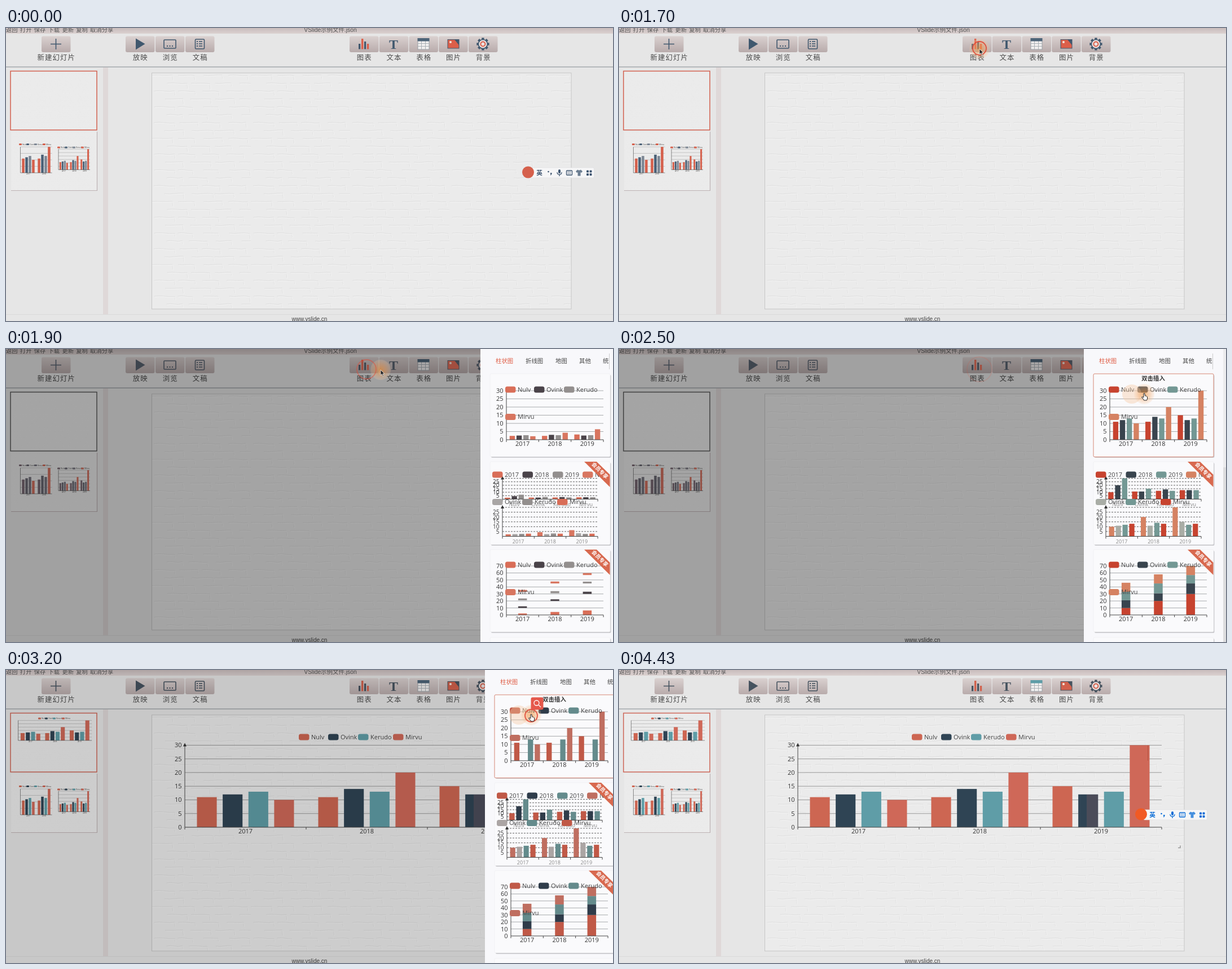
Write an HTML page that moves like this. It is 1076 px wide and 520 px high and loops after 4530 ms.

```html
<!DOCTYPE html>
<html lang="zh">
<head>
<meta charset="utf-8">
<title>Slide editor</title>
<style>
html, body { margin: 0; width: 100%; height: 100%; overflow: hidden; background: #e6e6e6; }
svg { display: block; width: 1076px; height: 520px; font-family: "Open Sans", "Noto Sans CJK SC", "Noto Sans CJK", sans-serif; }
svg {
  --ink: #40586e; --acc: #dc5f4a; --th: #4d6478; --sel: #d2604f;
  --s0: #d5604c; --s1: #4a6076; --s2: #7d8794; --s3: #d5604c;
  --p0: #d96e58; --p1: #4a4349; --p2: #938f8e; --p3: #d87660; --p4: #a9a6a5;
  --ime: #3e5570; --logo: #d5604c;
}
svg[data-look="dim"], svg[data-look="pick"] {
  --ink: #58626f; --acc: #e8705a; --sel: #5c5c5c;
  --s0: #7a6a74; --s1: #6a6872; --s2: #787680; --s3: #d2705f;
}
svg[data-look="pick"] { --p0: #c7432f; --p1: #39444e; --p2: #739894; --p3: #d58262; --p4: #a9ada6; }
svg[data-look="done"], svg[data-look="insert"] {
  --ink: #46535f; --acc: #d2614c; --th: #5f9da7; --sel: #cd6657;
  --s0: #cd6652; --s1: #2f4454; --s2: #5f9da7; --s3: #cf6858;
  --p0: #c05947; --p1: #2f3c4a; --p2: #648b8c; --p3: #bf6e60; --p4: #aba5a4;
  --ime: #0a6cd6; --logo: #f15a24;
}
svg[data-look="insert"] { --th: #4d6478; }
.ink { fill: var(--ink); } .acc { fill: var(--acc); }
.line { fill: none; stroke: var(--ink); stroke-width: 1.6; }
.cjk { font-family: "Noto Sans CJK SC", "Noto Sans CJK", sans-serif; }
.arial { font-family: "Liberation Sans", "Noto Sans CJK SC", sans-serif; }
.grow { transform-box: fill-box; transform-origin: 50% 100%; transform: scaleY(var(--k, 1)); }
.imeInk { fill: var(--ime); }
.imeLine { fill: none; stroke: var(--ime); stroke-width: 1.3; }
</style>
</head>
<body>
<svg id="stage" viewBox="0 0 1076 520" xmlns="http://www.w3.org/2000/svg"></svg>
<script>
const LOOP = 4530;
const NAMES = ['Nulv', 'Ovink', 'Kerudo', 'Mirvu'];
const YEARS = ['2017', '2018', '2019'];
const SALES = [[11, 12, 13, 10], [11, 14, 13, 20], [15, 12, 13, 30]];
const SUMS = [[10, 11, 12, 13], [20, 11, 14, 13], [30, 15, 12, 13]];
const BY_NAME = NAMES.map((_, i) => SUMS.map(row => row[i]));

const rect = (x, y, w, h, attrs = '') => `<rect x="${x}" y="${y}" width="${w}" height="${h}" ${attrs}/>`;
const path = (d, attrs = '') => `<path d="${d}" ${attrs}/>`;
const text = (x, y, size, str, attrs = '') => `<text x="${x}" y="${y}" font-size="${size}" ${attrs}>${str}</text>`;
const group = (id, body, attrs = '') => `<g id="${id}" ${attrs}>${body}</g>`;
const MID = 'text-anchor="middle"', END = 'text-anchor="end"';

// Bar chart: four fifths of each category holds bars, 30% of a bar between them.
function chart(o) {
  const { x, y, w, h, max, step, data, cats, colors, size = 11, ink = '#333', grid = '#999', lw = 1 } = o;
  const base = y + h, cat = w / data.length, n = data[0].length;
  const bw = o.stack ? cat * 0.27 : cat * 0.8 / (n + 0.3 * (n - 1));
  let out = '';
  for (let v = 0; v <= max; v += step) {
    const gy = base - v / max * h;
    if (v && !(o.dash && v === max && o.noTop))
      out += path(`M${x} ${gy}H${x + w}`, `stroke="${grid}" stroke-width="${lw}" ${o.dash ? 'stroke-dasharray="3 2"' : ''}`);
    if (!o.hush && !(o.dash && (v === 0 || v === max)))
      out += text(x - 5.5, gy + size * 0.36, size, v, `${END} fill="${ink}"`);
  }
  data.forEach((row, i) => {
    let sum = 0;
    row.forEach((v, j) => {
      const bh = v / max * h;
      const bx = x + i * cat + (o.stack ? (cat - bw) / 2 : cat * 0.1 + j * bw * 1.3);
      out += rect(bx, base - sum / max * h - bh, bw, bh,
        `style="fill:var(--${colors[j]})" class="${o.grow ? 'grow' : ''} ${o.tag && j === 1 ? o.tag : ''}"`);
      if (o.stack) sum += bh / h * max;
    });
    out += text(x + (i + 0.5) * cat, base + size * (o.drop || 1), o.catSize || size, cats[i], `${MID} fill="${o.catInk || ink}"`);
  });
  out += path(`M${x} ${y - (o.arrow ? 2 : 0)}V${base}H${x + w}`, `fill="none" stroke="#444" stroke-width="${lw}"`);
  if (!o.hush) for (let i = 0; i <= data.length; i++)
    out += path(`M${x + i * cat} ${base}v4`, 'stroke="#444"');
  if (o.arrow) out += path(`M${x - 3} ${y + 2}l3 -6l3 6z`, 'fill="#333"');
  return out;
}

const key = (x, y, color, label, size = 11) =>
  rect(x, y - 5.5, 18.5, 11, `rx="3.5" style="fill:var(--${color})"`) + text(x + 22, y + size * 0.33, size, label, 'fill="#444"');

const tinyKeys = (xs, y) => xs.map((x, i) =>
  rect(x, y - 1.5, 5, 3, `rx="1" style="fill:var(--s${i})"`) + text(x + 6, y + 1.2, 3.4, NAMES[i], 'fill="#444"')).join('');

// Faint painted brickwork, repeated as a pattern.
function bricks() {
  let seed = 7, out = rect(0, 0, 176, 112, 'fill="#ebebeb"');
  const rnd = () => (seed = seed * 16807 % 2147483647) / 2147483647;
  for (let r = 0; r < 8; r++) for (let i = 0; i < 4; i++) {
    const x = i * 44 + (r % 2) * 22, y = r * 14 + 4, a = rnd() * 6, len = 24 + rnd() * 14;
    const d = `M${x + a} ${y}q${len / 4} ${rnd() * 3 - 1.5} ${len / 2} 0t${len / 2} ${rnd() * 2 - 1}l1 ${5 + rnd() * 5}`;
    out += path(d, 'fill="none" stroke="#dfdfdf"') +
      path(d, 'fill="none" stroke="#f3f3f3" transform="translate(1 1.3)"');
  }
  return out;
}

function button(x, label, icon) {
  return rect(x, 14.5, 51.5, 28.5, 'rx="3" fill="url(#btn)"') + icon +
    text(x + 26.3, 57.3, 12.4, label, `class="cjk" ${MID} fill="#4a4a4a" letter-spacing="1.1"`);
}

function toolbar() {
  let teeth = '';
  for (let i = 0; i < 8; i++) teeth += rect(843.2, 17.4, 4.4, 5, `class="ink" transform="rotate(${i * 45} 845.4 28.5)"`);
  const doc = [24, 28, 32].map(y => rect(338, y - 1, 2, 2, 'class="ink"') + path(`M342 ${y}h6`, 'class="line"')).join('');
  const cells = path('M730 27.5h20M730 32.5h20M736.5 23v15M743.5 23v15', 'stroke="#a9b0b5" fill="none"');
  return button(63, '新建幻灯片', path('M79 28.5h19M88.5 19v19', 'class="line"')) +
    button(212, '放映', path('M230 18.5L246.5 28.3L230 38.5z', 'class="ink"')) +
    button(265, '浏览', rect(280, 21, 21, 15, 'rx="1" class="line"') + [286, 290.5, 295].map(x => rect(x - 1, 31, 2, 2, 'class="ink"')).join('')) +
    button(318, '文稿', rect(335.5, 20, 16, 17, 'rx="1.5" class="line"') + doc) +
    button(609, '图表', rect(625, 28, 3.2, 9.5, 'class="ink"') + rect(630, 19, 3.4, 18.5, 'class="acc"') +
      rect(635, 24, 3.2, 13.5, 'class="ink"') + rect(640, 28, 3.2, 9.5, 'class="acc"')) +
    button(661.7, '文本', text(687, 36.5, 24, 'T', `${MID} class="ink" font-weight="bold" style="font-family:'Liberation Serif',serif"`)) +
    button(714.5, '表格', rect(730, 18.5, 20, 19.5, 'fill="#f1efef" stroke="#8d969d" stroke-width=".8"') + cells + rect(729.6, 18, 20.8, 5.5, 'style="fill:var(--th)"')) +
    button(767.2, '图片', rect(783, 20.5, 20, 15.5, 'class="acc" style="stroke:var(--ink);stroke-width:1"') +
      '<circle cx="788" cy="25" r="2" fill="#f4e6dc"/>' + path('M795 20.5h8v10z', 'class="ink"')) +
    button(820, '背景', teeth + '<circle cx="845.4" cy="28.5" r="8" fill="#e9e1e0" class="line" style="fill:#e9e1e0"/>' +
      '<circle cx="845.4" cy="28.5" r="4" fill="none" style="stroke:var(--acc);stroke-width:2"/>');
}

function page() {
  const menu = ['返回', '打开', '保存', '下载', '更新', '复制', '取消分享'];
  const s = ['s0', 's1', 's2', 's3'];
  const tiny = { colors: s, hush: true, size: 3, grid: '#aaa', lw: 0.6, step: 5, drop: 1.1 };
  const main = chart({ x: 317, y: 133.5, w: 645, h: 145.5, max: 30, step: 5, data: SALES, cats: YEARS, colors: s, arrow: true }) +
    [519, 571, 624, 686].map((x, i) => key(x, 119, s[i], NAMES[i])).join('') +
    rect(829, 221, 20, 57.5, 'fill="#4b4c59"') + path('M937.5 134V161', 'stroke="#b5523f"') +
    path('M991 315.500h4v-4', 'fill="none" stroke="#999" stroke-width="1.5"');
  const small = chart({ ...tiny, x: 21.6, y: 89.5, w: 130.5, h: 35.5, max: 30, data: SALES, cats: YEARS }) +
    tinyKeys([57, 69, 83, 99], 86);
  return rect(0, 0, 1076, 520, 'fill="#e6e6e6"') +
    rect(0, 0, 1076, 10, 'fill="url(#bar)"') +
    menu.map((m, i) => text(i * 24.85, 6.6, 10.3, m, 'class="cjk" fill="#555"')).join('') +
    text(575, 7, 10.4, 'VSlide示例文件.json', `class="arial" ${MID} fill="#555"`) +
    toolbar() + path('M0 69.200H1076', 'stroke="#969ca0" stroke-width="1.2"') +
    rect(172, 70, 9, 438, 'fill="#dfd8d8"') + path('M0 508.500H1076', 'stroke="#dadada"') +
    text(538, 519.8, 10, 'www.vslide.cn', `class="arial" ${MID} fill="#444"`) +
    rect(258.5, 79.8, 743.5, 419, 'fill="url(#brick)" stroke="#c6c6c6"') +
    rect(8, 76.500, 153, 104.5, 'fill="url(#brickS)" style="stroke:var(--sel)" stroke-width="1.5"') +
    rect(9, 184, 152, 104, 'fill="url(#brickS)"') + path('M9 288.500H161.500V184', 'fill="none" stroke="#bdb2b3" stroke-width="1.2"') +
    chart({ ...tiny, x: 25.5, y: 211, w: 56, h: 46, max: 20, data: SALES.slice(0, 2), cats: YEARS }) + tinyKeys([23, 36, 50, 65], 206.5) +
    chart({ ...tiny, x: 93, y: 215, w: 56, h: 36.5, max: 30, data: SALES, cats: YEARS }) + tinyKeys([91, 104, 118, 133], 212) +
    group('inserted', main + small);
}

// Drawer content in its own coordinates; the group is moved as a whole.
function drawer() {
  const p = ['p0', 'p1', 'p2', 'p3'];
  const ribbon = y => path(`M184 ${y}h22l23.500 23v22z`, 'fill="#d8694f"') +
    text(0, 0, 9.2, '会员专享', `class="cjk" ${MID} fill="#fff" font-weight="bold" transform="translate(209.500 ${y + 18}) rotate(45)"`);
  const card = (y, h) => rect(19, y + 2, 212.500, h, 'rx="2" fill="#c9c9cd"') + rect(17, y, 213, h, 'rx="2" fill="#fafafc" stroke="#ececef" stroke-width=".6"');
  const keys = (y) => [[44, 0], [95, 0], [148, 0], [44, 48.500]].map(([x, dy], i) => key(x, y + dy, p[i], NAMES[i])).join('');
  const tabs = [[27, '柱状图'], [80, '折线图'], [133, '地图'], [175, '其他'], [217, '统']];
  const wide = { x: 46, w: 172, cats: YEARS, colors: p, grow: true, grid: '#a8abad' };
  const thin = { x: 39, w: 169, step: 5, max: 30, dash: true, arrow: true, grow: true, size: 10, grid: '#666', catSize: 9, catInk: '#888', drop: 1.25 };
  return rect(0, 0, 260, 520, 'fill="#f8f8fb"') +
    tabs.map(([x, s], i) => text(x, 24.8, 10.4, s, `class="cjk" fill="${i ? '#444' : '#df5a42'}"`)).join('') +
    rect(228, 6, 20, 30, 'fill="#f8f8fb"') + path('M228.500 8V36', 'stroke="#ccc"') +
    card(44, 147) + card(200, 147) + card(356, 146) + card(512, 146) +
    chart({ ...wide, y: 74, h: 87, max: 30, step: 5, data: SALES, tag: 'second' }) + keys(72) +
    group('hover', rect(17, 44, 213, 147.500, 'rx="2" fill="none" stroke="#d98a78"') +
      text(123, 56, 10.4, '双击插入', `class="cjk" ${MID} font-weight="bold" fill="#333"`)) +
    chart({ ...thin, y: 229.500, h: 37, data: BY_NAME, cats: NAMES, colors: p }) +
    chart({ ...thin, y: 281, h: 51.500, data: SUMS, cats: YEARS, colors: ['p3', 'p4', 'p2', 'p0'] }) +
    YEARS.map((s, i) => key(21 + i * 53.500, 223, p[i], s)).join('') + key(181, 223, 'p3', NAMES[0][0]) +
    key(21, 271.500, 'p4', NAMES[1]) + key(74, 271.500, 'p2', NAMES[2]) + key(136, 271.500, 'p0', NAMES[3]) + ribbon(200) +
    chart({ ...wide, y: 385, h: 87, max: 70, step: 10, data: SUMS, stack: true }) + keys(383) + ribbon(356) +
    rect(247, 0, 5, 520, 'fill="#ececee"') + rect(247, 210, 5, 310, 'fill="#dddddf"');
}

function ime() {
  const dots = [[1029, 252.500], [1034.500, 252.500], [1029, 258], [1034.500, 258]]
    .map(([x, y]) => rect(x, y, 4, 4, 'rx="1" class="imeInk"')).join('');
  return rect(930, 248, 112.500, 18, 'rx="2" fill="#f6f6f7" stroke="#dcdcde" stroke-width=".6"') +
    '<circle cx="925.500" cy="256" r="10.500" style="fill:var(--logo)"/>' +
    text(945.500, 261, 10.6, '英', `class="cjk imeInk" ${MID} font-weight="bold"`) +
    '<circle cx="961.500" cy="255" r="1.300" class="imeInk"/>' + path('M965 257h2.500v2l-2 3z', 'class="imeInk"') +
    rect(979, 251, 4, 7, 'rx="2" class="imeInk"') + path('M977 256q0 4 4 4t4 -4M981 260v3', 'class="imeLine"') +
    rect(993.500, 253, 10, 8, 'rx="1" class="imeLine"') + path('M995.500 255.500h6M995.500 258.500h6', 'class="imeLine" stroke-dasharray="1.200 1"') +
    path('M1013 251.500q3 2 6 0l3 3l-2 2.500l-1.500 -1v6.500h-5v-6.500l-1.500 1l-2 -2.500z', 'class="imeInk" opacity=".75"') + dots;
}

const arrow = path('M0 0v9.500l2.300 -2l1.800 3.700l1.500 -.7l-1.700 -3.600h3z', 'fill="#222" stroke="#fff" stroke-width=".7"');
const hand = path('M-1 -1q1.500 -1 2 0l.500 4q3 0 4 2v4q-1 1 -1 2h-5q-1 -3 -4 -5q0 -1.500 1.500 -1l2 1z', 'fill="#fff" stroke="#222"');
const glass = rect(930.500, 48.500, 22, 22, 'rx="3" fill="#e5584c"') +
  '<circle cx="940.500" cy="58.500" r="4.500" fill="none" stroke="#fff" stroke-width="1.300"/>' + path('M944 62l4 4', 'stroke="#fff" stroke-width="1.300"');

const stage = document.getElementById('stage');
stage.innerHTML = `<defs>
  <linearGradient id="btn" x2="0" y2="1"><stop stop-color="#dad1d0"/><stop offset="1" stop-color="#b8abab"/></linearGradient>
  <linearGradient id="bar" x2="0" y2="1"><stop stop-color="#c8bcbc"/><stop offset="1" stop-color="#dbd1d0"/></linearGradient>
  <radialGradient id="glow"><stop stop-color="#f09038" stop-opacity=".65"/><stop offset=".6" stop-color="#f3a868" stop-opacity=".4"/><stop offset="1" stop-color="#f6cda8" stop-opacity=".2"/></radialGradient>
  <pattern id="brick" width="176" height="112" patternUnits="userSpaceOnUse" x="258" y="80">${bricks()}</pattern>
  <pattern id="brickS" width="176" height="112" patternUnits="userSpaceOnUse" patternTransform="translate(8 76) scale(.206 .25)">${bricks()}</pattern>
</defs>` + page() + group('ime', ime()) + rect(0, 0, 1076, 520, 'id="shade" opacity="0"') + group('drawer', drawer()) +
  '<circle id="trail" cx="909" cy="80" r="17" fill="#f5c8a0" opacity=".4"/>' +
  group('pointer', '<circle r="18" fill="url(#glow)"/>') +
  '<circle id="ring" fill="none" stroke="#e04a38" stroke-width="1.800"/>' + group('glass', glass) +
  group('arrow', arrow) + group('hand', hand);

const $ = id => document.getElementById(id);
const el = {};
for (const id of ['inserted', 'ime', 'shade', 'drawer', 'hover', 'trail', 'pointer', 'ring', 'glass', 'arrow', 'hand']) el[id] = $(id);
const second = stage.querySelectorAll('.second');

const MOVE = [[700, 955, 1], [800, 915, 7], [900, 820, 24], [1000, 720, 46], [1100, 655, 57], [1200, 640, 40], [1300, 639, 37],
  [1700, 639, 37], [1800, 645, 36], [1900, 664, 37], [2000, 710, 46], [2200, 812, 66], [2400, 918, 80], [2500, 931, 80],
  [3300, 931, 80], [3700, 960, 61], [3800, 962, 60], [3900, 990, 35], [4000, 1028, 8]];
const SLIDE = [[1700, 1080], [1800, 935], [1900, 841], [2000, 824], [3050, 824], [3100, 826], [3200, 849], [3300, 950], [3400, 1080]];
const SHADE = [[1700, 0], [1800, .17], [1900, .3], [3050, .3], [3200, .13], [3300, .05], [3400, 0]];

function at(keys, t, col = 1) {
  if (t <= keys[0][0]) return keys[0][col];
  for (let i = 1; i < keys.length; i++) {
    const a = keys[i - 1], b = keys[i];
    if (t <= b[0]) return a[col] + (b[col] - a[col]) * (t - a[0]) / (b[0] - a[0]);
  }
  return keys[keys.length - 1][col];
}
const show = (node, on) => { node.style.display = on ? '' : 'none'; };

function render(now) {
  const ms = now % LOOP;
  const t = ms < 4200 ? Math.floor(ms / 100) * 100 : ms;
  stage.dataset.look = t < 1800 ? 'plain' : t < 2000 ? 'dim' : t < 2700 ? 'pick' : t < 3300 ? 'insert' : 'done';

  const x = at(MOVE, t, 1), y = at(MOVE, t, 2), moving = t >= 700 && t < 4100;
  const onCard = t >= 2300 && t < 3400;
  el.pointer.setAttribute('transform', `translate(${x} ${y})`);
  el.arrow.setAttribute('transform', `translate(${x} ${y})`);
  el.hand.setAttribute('transform', `translate(${x} ${y})`);
  show(el.pointer, moving);
  show(el.arrow, moving && !onCard);
  show(el.hand, moving && onCard);
  show(el.trail, t >= 2400 && t < 3300);

  const first = t >= 1600 && t < 2700, again = t >= 2700 && t < 3300;
  show(el.ring, first || again);
  el.ring.setAttribute('cx', again ? 931 : 639);
  el.ring.setAttribute('cy', again ? 81 : 36);
  el.ring.setAttribute('r', again ? 11 : at([[1700, 12], [1900, 17], [2500, 22]], t));
  el.ring.setAttribute('opacity', again ? .9 : at([[1700, .95], [1900, .5], [2500, .15]], t));

  el.drawer.setAttribute('transform', `translate(${at(SLIDE, t)} 0)`);
  el.shade.setAttribute('opacity', at(SHADE, t));
  const rest = 1 - Math.min(1, Math.max(0, (t - 1850) / 650));
  el.drawer.style.setProperty('--k', 1 - rest ** 3);
  show(el.hover, t >= 2400);
  second.forEach(bar => show(bar, t < 3000));
  show(el.inserted, t >= 3100);
  show(el.glass, t >= 3000 && t < 4330);
  show(el.ime, t < 1300 || t >= 4330);
}

function tick() {
  render(performance.now());
  requestAnimationFrame(tick);
}
tick();
</script>
</body>
</html>
```
